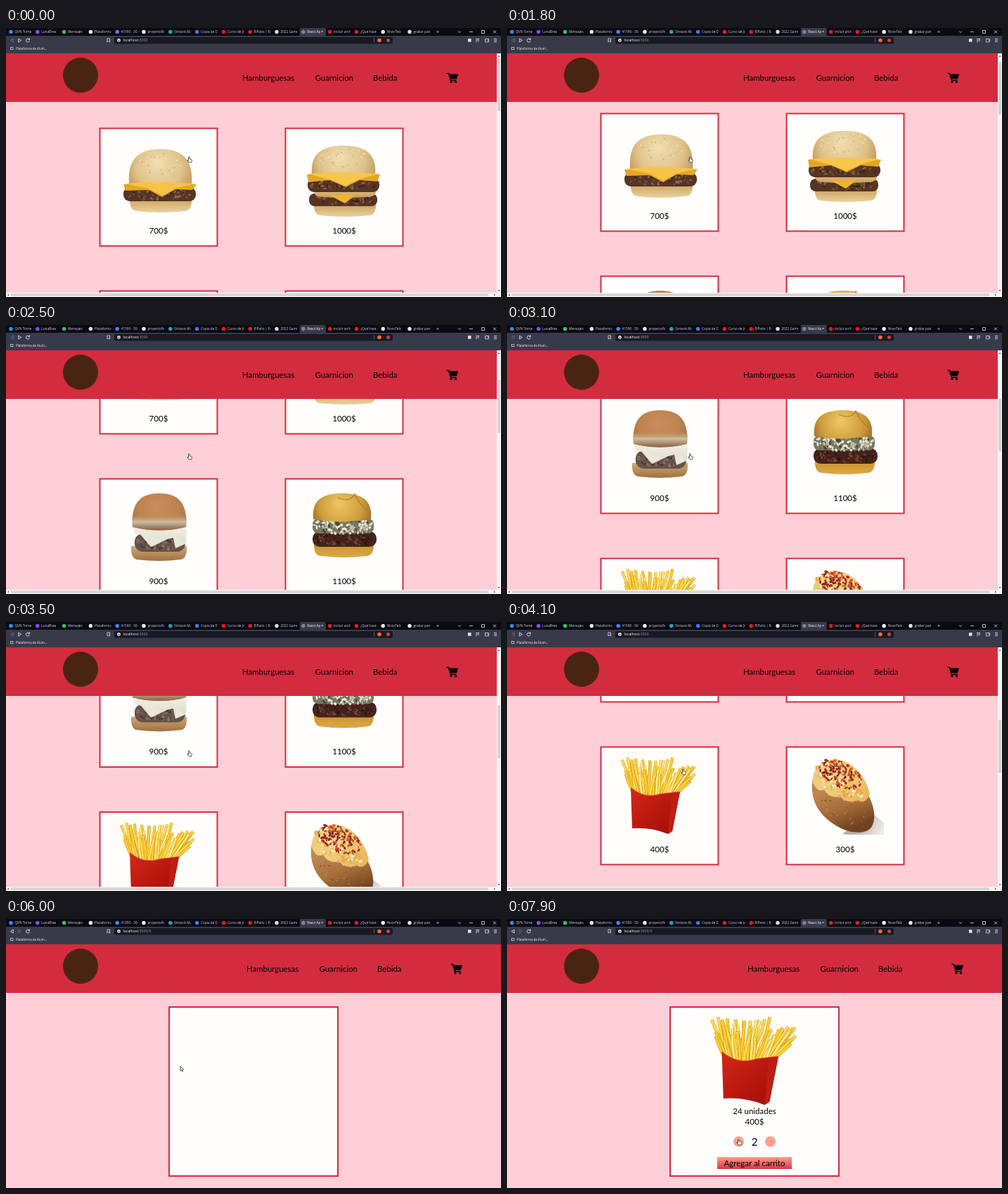
These frames come from a looping animation (704 by 382 pixels, 8 s). An HTML page with a canvas:

```html
<!DOCTYPE html>
<html lang="es">
<head>
<meta charset="utf-8">
<title>Hamburguesas</title>
<style>
html, body { margin: 0; width: 100%; height: 100%; overflow: hidden; background: #ffcfd7; }
canvas { display: block; width: 704px; height: 382px; }
</style>
</head>
<body>
<canvas id="stage" width="704" height="382"></canvas>
<script>
const ctx = document.getElementById('stage').getContext('2d');
const LOOP = 8000, STEP = 100;
const OPEN_ITEM = 4600, ITEM_READY = 6100, COUNT_UP = 7800;
const RED = '#d42c3f', PINK = '#ffcfd7';
const PAGE_FONT = 'Lato, sans-serif', UI_FONT = '"Open Sans", sans-serif';

const SCROLL = [[1700, 0], [1800, 21], [2500, 155], [3100, 273], [4100, 427]];
const CURSOR_X = [[3500, 261], [4100, 251], [4500, 251], [4600, 248], [6100, 248], [6800, 330]];
const CURSOR_Y = [[3500, 187], [4100, 213], [4500, 213], [4600, 212], [6100, 212], [6800, 317]];

function tween(keys, t) {
  if (t <= keys[0][0]) return keys[0][1];
  for (let i = 1; i < keys.length; i++) {
    const [t0, a] = keys[i - 1], [t1, b] = keys[i];
    if (t <= t1) return a + (b - a) * (t - t0) / (t1 - t0);
  }
  return keys[keys.length - 1][1];
}

function random(seed) {
  return () => (seed = (seed * 16807) % 2147483647) / 2147483647;
}

function rect(x, y, w, h, color) {
  ctx.fillStyle = color;
  ctx.fillRect(x, y, w, h);
}

function roundRect(x, y, w, h, r, color) {
  ctx.fillStyle = color;
  ctx.beginPath();
  ctx.roundRect(x, y, w, h, r);
  ctx.fill();
}

function ellipse(x, y, rx, ry, color, angle = 0) {
  ctx.fillStyle = color;
  ctx.beginPath();
  ctx.ellipse(x, y, rx, ry, angle, 0, 7);
  ctx.fill();
}

function shape(path, fill, stroke, width = 1) {
  const p = new Path2D(path);
  if (fill) { ctx.fillStyle = fill; ctx.fill(p); }
  if (stroke) { ctx.strokeStyle = stroke; ctx.lineWidth = width; ctx.stroke(p); }
}

function text(str, x, y, size, color = '#000', align = 'left', font = PAGE_FONT) {
  ctx.font = `${size}px ${font}`;
  ctx.textAlign = align;
  ctx.textBaseline = 'middle';
  ctx.fillStyle = color;
  ctx.fillText(str, x, y);
}

function shade(x0, y0, x1, y1, ...colors) {
  const g = ctx.createLinearGradient(x0, y0, x1, y1);
  colors.forEach((c, i) => g.addColorStop(i / (colors.length - 1), c));
  return g;
}

function at(x, y, scale, draw) {
  ctx.save();
  ctx.translate(x, y);
  ctx.scale(scale, scale);
  draw();
  ctx.restore();
}

// Scatters small blobs within a rotated ellipse.
function specks(seed, n, x, y, rx, ry, size, colors, angle = 0) {
  const rnd = random(seed);
  for (let i = 0; i < n; i++) {
    const a = rnd() * 6.283, r = Math.sqrt(rnd());
    const u = Math.cos(a) * r * rx, v = Math.sin(a) * r * ry;
    ellipse(x + u * Math.cos(angle) - v * Math.sin(angle),
      y + u * Math.sin(angle) + v * Math.cos(angle),
      size * (.6 + rnd()), size * (.4 + rnd() * .6), colors[i % colors.length], rnd() * 3);
  }
}

// Food is drawn in card coordinates.
function dome(x, y, w, h, light, mid, dark) {
  const g = ctx.createRadialGradient(x + w * .45, y + h * .35, 2, x + w * .5, y + h * .5, w * .58);
  g.addColorStop(0, light);
  g.addColorStop(.6, mid);
  g.addColorStop(1, dark);
  shape(`M${x + 1},${y + h * .92} C${x - 2},${y + h * .2} ${x + w * .2},${y} ${x + w / 2},${y}
    C${x + w * .8},${y} ${x + w + 2},${y + h * .2} ${x + w - 1},${y + h * .92}
    Q${x + w / 2},${y + h * 1.1} ${x + 1},${y + h * .92}Z`, g);
}

function heel(x, y, w, h, light, dark) {
  shape(`M${x},${y} H${x + w} Q${x + w + 1},${y + h * .8} ${x + w - 8},${y + h * .9}
    Q${x + w / 2},${y + h * 1.1} ${x + 8},${y + h * .9} Q${x - 1},${y + h * .8} ${x},${y}Z`,
    shade(0, y, 0, y + h, light, dark));
}

function patty(x, y, w, h, color, seed, tones) {
  roundRect(x, y, w, h, h * .45, color);
  specks(seed, 75, x + w / 2, y + h / 2, w * .47, h * .42, 1.8, tones);
}

const BEEF = ['#3b2418', '#74503a', '#5a3827', '#8b6851'];

function cheeseBurger() {
  heel(43, 98, 88, 22, '#c79c5c', '#ead29a');
  patty(34, 84, 103, 20, '#553424', 11, BEEF);
  dome(41, 30, 91, 54, '#efdcae', '#e0c38b', '#bd9555');
  specks(5, 40, 86, 50, 36, 16, 1.2, ['#d4b375', '#f0dfb5']);
  shape('M34,80 Q86,75 138,80 L132,88 L108,87 L89,98 L70,88 L37,89Z', '#e5a623');
  shape('M36,79 Q86,75 136,79 L108,86 L89,96 L70,86Z', '#f6c445');
}

function doubleBurger() {
  heel(41, 106, 88, 20, '#c79c5c', '#ead29a');
  patty(34, 93, 97, 18, '#553424', 17, BEEF);
  heel(40, 84, 90, 15, '#e5cc94', '#c99c58');
  shape('M62,95 H100 L85,107Z', '#efb42b');
  patty(32, 71, 102, 20, '#553424', 23, BEEF);
  dome(37, 25, 92, 46, '#efdcae', '#dfc28a', '#b99152');
  specks(7, 36, 82, 43, 36, 14, 1.2, ['#d2b071', '#f0dfb5']);
  shape('M31,66 Q82,61 135,66 L131,76 L106,74 L86,84 L64,74 L33,77Z', '#e5a623');
  shape('M33,65 Q82,61 133,65 L105,73 L86,82 L65,74Z', '#f7c64b');
}

function whiteCheeseBurger() {
  heel(45, 96, 79, 21, '#d0a878', '#a0703f');
  patty(50, 78, 72, 26, '#655249', 31, ['#443730', '#897567', '#75655a']);
  shape('M48,71 Q85,66 124,71 L123,92 L106,84 L97,86 L74,97 L66,81 L51,79Z',
    shade(0, 70, 0, 97, '#f0eee2', '#dcd9cc'));
  shape('M104,80 L124,92 L108,99Z M56,77 L73,97 L89,88Z', '#e9e6da');
  dome(46, 21, 78, 52, '#c98d5b', '#bd8350', '#a8734a');
  shape('M46,54 Q85,45 124,54 L123,69 Q85,78 47,69Z',
    shade(0, 50, 0, 73, '#bd835000', '#cdbda2', '#8d6444'));
}

function blueCheeseBurger() {
  heel(41, 90, 85, 22, '#c98f2f', '#dba844');
  patty(39, 75, 91, 22, '#42221a', 41, ['#28130f', '#60362a', '#784538']);
  roundRect(39, 57, 87, 21, 8, '#777661');
  specks(43, 110, 82, 67, 42, 12, 2.3, ['#dedcc3', '#b9b99d', '#45483a', '#efecd8']);
  dome(39, 21, 84, 40, '#edc466', '#cf9d3c', '#946820');
  shape('M75,27 C91,34 96,27 99,22 Q107,39 119,47', null, '#ab7b29', 1.3);
}

function fries() {
  const rnd = random(97), count = 58;
  ctx.lineCap = 'butt';
  for (let i = 0; i < count; i++) {
    const k = rnd(), x = 49 + k * 56;
    const lean = -.3 + k + (rnd() - .5) * .45;
    const length = 57 - 27 * i / count + rnd() * 5;
    const tipX = Math.min(136, x + Math.sin(lean) * length);
    const tipY = 73 - Math.cos(lean) * length;
    const bend = (rnd() - .5) * 6;
    const line = `M${x},73 Q${(x + tipX) / 2 + bend},${(73 + tipY) / 2} ${tipX},${tipY}`;
    shape(line, null, '#cb8d17', 3.9);
    shape(line, null, ['#ffdc48', '#fbcd34', '#ffe985'][i % 3], 3);
  }
  shape('M43,58 Q63,75 86,67 L113,64 L102,120 L96,124 Q72,114 45,116Z',
    shade(43, 60, 100, 122, '#d02a19', '#bd190f', '#a31009'));
  shape('M101,65 L113,64 L102,120 L96,124Z', '#bd1d13');
  shape('M43,58 Q63,75 86,67 L113,64', null, '#e3472e', .8);
}

function potato() {
  shape('M80,124 L120,92 L139,108 V125 H88Z', shade(105, 100, 139, 116, '#b9afa9', '#eeebea'));
  shape('M38,45 C33,72 44,92 62,106 C79,120 107,128 120,116 C130,105 125,78 112,62 L75,36Z',
    shade(62, 60, 84, 119, '#bd8650', '#a66d3b', '#70431f'));
  specks(61, 45, 83, 91, 38, 17, 1, ['#835528', '#bd8650'], .5);
  shape('M38,51 C36,32 52,18 69,18 C94,18 114,42 119,68 Q112,83 102,76 Q87,82 77,71 Q61,74 54,61 Q44,66 38,51Z',
    shade(48, 20, 96, 80, '#efc77a', '#f1cf82', '#eab85f'));
  specks(67, 105, 77, 50, 40, 21, 2.5, ['#faedc4', '#eec069', '#f5d88d', '#e7a94f'], .58);
  specks(71, 140, 77, 39, 33, 17, 1.8, ['#9f2815', '#bd3c20', '#782116', '#d35b32'], .45);
}

const MENU = [
  ['700$', cheeseBurger], ['1000$', doubleBurger],
  ['900$', whiteCheeseBurger], ['1100$', blueCheeseBurger],
  ['400$', fries], ['300$', potato],
];

function box(x, y, size) {
  rect(x, y, size, size, RED);
  rect(x + 2, y + 2, size - 4, size - 4, '#fffefd');
}

function listPage(scroll) {
  MENU.forEach(([price, food], i) => {
    const x = i % 2 ? 397 : 133, y = 142 + (i >> 1) * 231 - scroll;
    if (y > 382 || y < -70) return;
    box(x - .5, y - .5, 169);
    at(x, y, 1, food);
    text(price, x + 84, y + 146, 11.6, '#000', 'center');
  });
}

function itemPage(t) {
  box(231, 124, 242);
  if (t < ITEM_READY) return;
  at(256, 121.5, 1.15, fries);
  text('24 unidades', 352, 273, 11.5, '#000', 'center');
  text('400$', 352, 288, 11.6, '#000', 'center');
  ellipse(329.5, 316, 7.5, 7.5, '#ffa18d');
  ellipse(374.5, 316, 7.5, 7.5, '#ffa18d');
  text('+', 329.5, 316, 6, '#333', 'center');
  text('-', 374.5, 316, 6, '#8a4a40', 'center');
  text(t < COUNT_UP ? '1' : '2', 352, 317.5, 15, '#000', 'center');
  rect(299, 338, 106, 17, shade(0, 338, 0, 355, '#ff9d8c', '#d83649'));
  text('Agregar al carrito', 352, 347, 11.5, '#000', 'center');
}

function cart() {
  shape('M0,1 H3 L6,11 H14', null, '#000', 1.6);
  shape('M3,2 H16.5 L14.5,9 H5Z', '#000');
  ellipse(6.5, 13.2, 1.6, 1.6, '#000');
  ellipse(13, 13.2, 1.6, 1.6, '#000');
}

function header(shift) {
  rect(0, 36, 704, 69, RED);
  ellipse(106, 67, 25, 25, '#4a2413');
  text('Hamburguesas', 336 + shift, 72, 11.4);
  text('Guarnicion', 439.5 + shift, 72, 11.4);
  text('Bebida', 522 + shift, 72, 11.4);
  at(626.5 + shift, 63.5, 1, cart);
}

function scrollbars(scroll) {
  rect(698, 36, 6, 346, '#f6f6f6');
  rect(0, 376, 704, 6, '#f6f6f6');
  rect(699, 43 + scroll * .225, 4, 75, '#d3d3d3');
  rect(7, 377, 679, 4, '#d6d6d6');
  shape('M699.5,41 L701,39 L702.5,41Z M699.5,372 L701,374 L702.5,372Z', '#555');
  shape('M4,377.5 L2,379 L4,380.5Z M694,377.5 L696,379 L694,380.5Z', '#555');
}

const TABS = [
  ['#1d9bf0', 'QVN Torneo'], ['#9147ff', 'LunaBrea'], ['#35c759', 'Mensajes'],
  ['#eeeeee', 'Plataforma d'], ['#3d8bff', '41590 - 30/'], ['#f2f2f2', 'proyectoFin'],
  ['#22a7c3', 'Sintaxis Mar'], ['#3b7ded', 'Copia de De'], ['#f01818', 'Curso de JA'],
  ['#f01818', 'ElPatio | En'], ['#dddddd', '2022 Gamma'], ['#7a8794', 'React Ap'],
  ['#f01818', 'incluir archi'], ['#f01818', '¿Qué hace u'], ['#f2f2f2', 'NivorTelz'],
  ['#e8e8e8', 'grabar pant'],
];

function tab([color, label], i) {
  const x = 7 + i * 37.8, active = i === 11;
  if (active) roundRect(x - 5, 0, 37, 12, [2, 2, 0, 0], '#383a4a');
  ellipse(x, 5.5, 2.7, 2.7, color);
  ctx.save();
  ctx.beginPath();
  ctx.rect(x + 5, 0, active ? 19 : 24, 11);
  ctx.clip();
  text(label, x + 5.5, 5.8, 4.7, active ? '#fff' : '#d5d5da', 'left', UI_FONT);
  ctx.restore();
  if (active) text('×', x + 27, 5.5, 6, '#fff', 'center', UI_FONT);
}

function browser(url, canGoBack) {
  const line = '#e4e4ea', dim = '#6d6f80';
  rect(0, 0, 704, 11, '#0a0a15');
  rect(0, 11, 704, 25, '#383a4a');
  TABS.forEach(tab);
  text('+', 614, 5.5, 8, line, 'center', UI_FONT);
  shape('M643,4.5 L645,6.5 L647,4.5 M659,5.5 H664 M676.5,3.5 H680.5 V7.5 H676.5Z M693,3.5 L697,7.5 M697,3.5 L693,7.5', null, line, .8);
  shape('M10.3,15 V20 L6.5,17.5Z', null, canGoBack ? line : dim, .9);
  shape('M17.8,15 V20 L21.6,17.5Z', null, canGoBack ? dim : line, .9);
  shape('M33,16 A2.5,2.5 0 1 0 33.5,18 M33.5,14.5 V16.5 H31.5', null, line, .9);
  shape('M144,15 H147.5 V20 L145.8,18.5 L144,20Z', null, line, .8);
  roundRect(154, 13, 396, 9.5, 2, '#181923');
  ellipse(160.5, 17.5, 2.4, 2.4, '#dddde3');
  rect(160.2, 16.8, .7, 2.2, '#222');
  text('localhost', 166.5, 17.8, 5.2, '#fff', 'left', UI_FONT);
  text(url, 166.5 + ctx.measureText('localhost').width, 17.8, 5.2, '#9d9eaa', 'left', UI_FONT);
  rect(523, 14.5, .7, 6, '#777887');
  ellipse(531, 17.5, 2.8, 2.8, '#fb6b35');
  ellipse(543.5, 17.5, 2.5, 2.5, '#d0443a');
  rect(657, 15.2, 4.5, 4.5, line);
  shape('M668,15.5 H673 M668,17.5 H671 M668,19.5 H670 M672,15.5 V19.5', null, line, .8);
  shape('M681.5,15.5 H686.5 V19.8 H681.5Z M684.5,17.5 H686.5', null, line, .8);
  shape('M694,15.5 H698 M694,17.5 H698 M694,19.5 H698', null, line, .8);
  rect(6, 27, 4.5, 4, '#aeb0bb');
  rect(7, 28, 2.5, 2, '#383a4a');
  text('Plataforma de Alum...', 14, 29.5, 4.4, '#f2f2f5', 'left', UI_FONT);
}

function hand() {
  shape('M-1.5,1 V-3.8 Q-.7,-5 .1,-3.8 V-1.2 L2.6,-.5 Q3.6,0 3.3,1.4 L2.5,4 H-.7 L-3.2,.7 Q-2.8,-.3 -1.5,1Z', '#fff', '#222', .8);
}

function arrow() {
  shape('M0,-3 V3.6 L1.5,2.3 L2.6,4.6 L3.6,4.1 L2.6,1.9 L4.6,1.8Z', '#fff', '#222', .8);
}

function draw(t) {
  const onItem = t >= OPEN_ITEM, scroll = tween(SCROLL, t);
  rect(0, 0, 704, 382, PINK);
  if (onItem) itemPage(t);
  else listPage(scroll);
  header(onItem ? 6 : 0);
  if (!onItem) scrollbars(scroll);
  browser(onItem ? ':3000/5' : ':3000', onItem);
  const pointing = !onItem || t >= 6700;
  at(tween(CURSOR_X, t), tween(CURSOR_Y, t), 1, pointing ? hand : arrow);
}

function frame() {
  const t = performance.now() % LOOP;
  draw(Math.floor(t / STEP) * STEP);
  requestAnimationFrame(frame);
}
frame();
</script>
</body>
</html>
```
